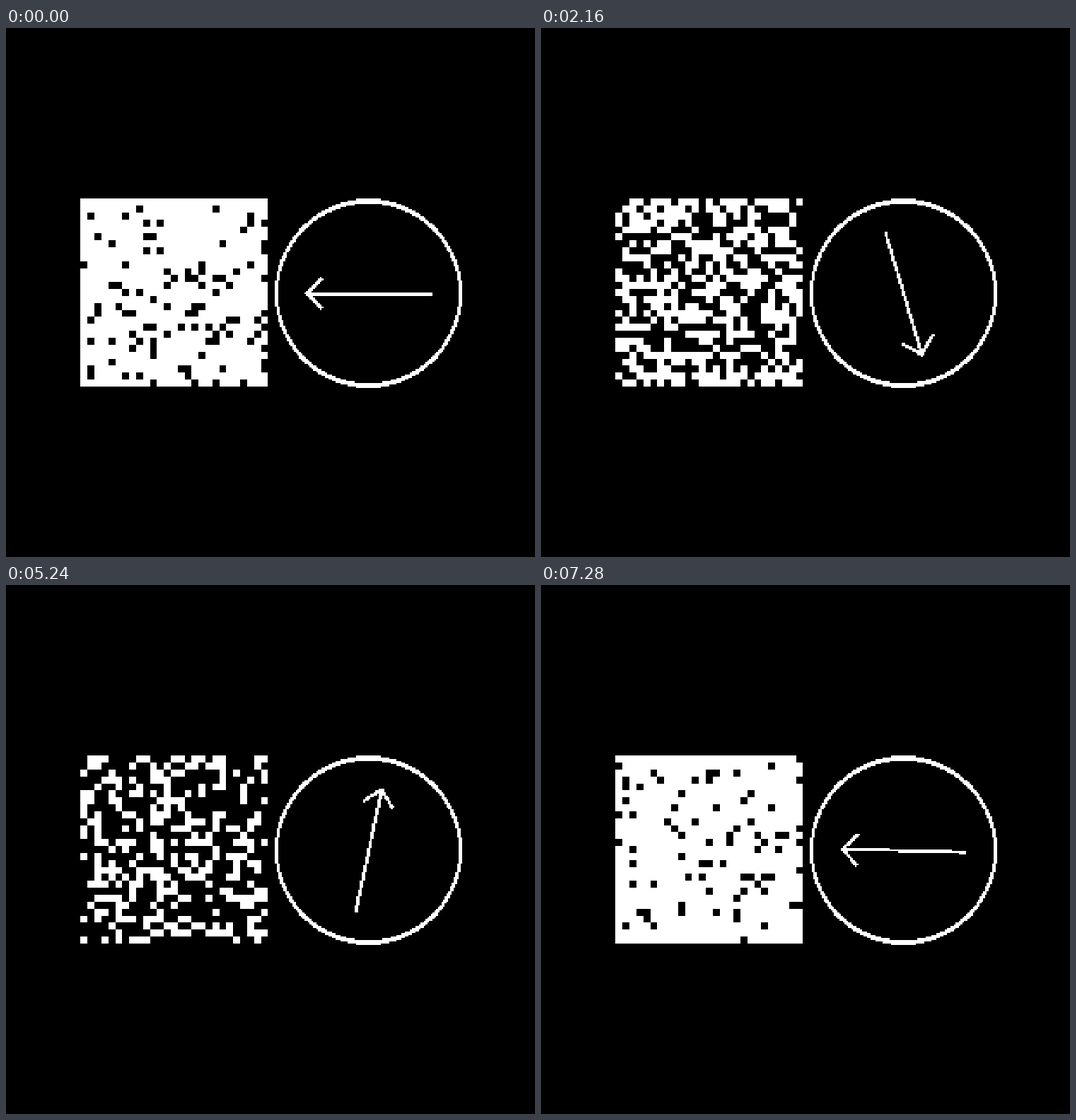
These frames come from a looping animation (748 by 748 pixels, 7.32 s). An HTML page with a canvas:

```html
<!DOCTYPE html>
<html lang="en">
<head>
<meta charset="utf-8">
<title>Noise and arrow</title>
<style>
  html, body { margin: 0; width: 100%; height: 100%; overflow: hidden; background: #000; }
  canvas { display: block; width: 100vw; height: 100vh; image-rendering: pixelated; }
</style>
</head>
<body>
<canvas id="stage" width="305" height="304"></canvas>
<script>
const ctx = document.getElementById('stage').getContext('2d');
const STEP = 40, STEPS = 183;
const GRID = { x: 43, y: 98, count: 27, size: 4 };
const RING = { x: 208.5, y: 152 };
const HUB = { x: 209, y: 152.5 };
const REACH = 36, BARB = 12;

function seeded(seed) {
  let s = seed >>> 0;
  return () => {
    s = (s + 0x6D2B79F5) >>> 0;
    let t = Math.imul(s ^ (s >>> 15), s | 1);
    t ^= t + Math.imul(t ^ (t >>> 7), t | 61);
    return ((t ^ (t >>> 14)) >>> 0) / 4294967296;
  };
}

const dot = (x, y) => ctx.fillRect(x, y, 1, 1);

// Hard-edged line about two units wide
function line(x0, y0, x1, y1) {
  const dx = x1 - x0, dy = y1 - y0, len = Math.hypot(dx, dy);
  for (let y = Math.min(y0, y1) - 2; y <= Math.max(y0, y1) + 2; y++) {
    for (let x = Math.min(x0, x1) - 2; x <= Math.max(x0, x1) + 2; x++) {
      const px = x - x0 - 0.16, py = y - y0 - 0.16;
      const along = (px * dx + py * dy) / len;
      const off = Math.abs(px * dy - py * dx) / len;
      if (off <= 0.94 && along >= -0.75 && along <= len + 0.75) dot(x, y);
    }
  }
}

function ring() {
  const inside = (x, y, rx, ry) => (x / rx) ** 2 + (y / ry) ** 2 <= 1;
  for (let y = 98; y < 207; y++) {
    for (let x = 155; x < 263; x++) {
      const px = x - RING.x, py = y - RING.y;
      if (inside(px, py, 54, 54.4) && !inside(px, py, 52, 51.6)) dot(x, y);
    }
  }
}

function arrow(angle) {
  const ux = -Math.cos(angle), uy = Math.sin(angle);
  const tipX = Math.floor(HUB.x + REACH * ux), tipY = Math.floor(HUB.y + REACH * uy);
  line(tipX, tipY, Math.floor(HUB.x - REACH * ux), Math.floor(HUB.y - REACH * uy));
  for (const turn of [-Math.PI / 4, Math.PI / 4]) {
    const a = angle + turn;
    line(tipX, tipY, Math.round(tipX + BARB * Math.cos(a)), Math.round(tipY - BARB * Math.sin(a)));
  }
}

function noise(step, angle) {
  const random = seeded(step * 7919 + 17);
  const density = 0.55 + 0.35 * Math.cos(angle - 0.22);
  for (let r = 0; r < GRID.count; r++) {
    for (let c = 0; c < GRID.count; c++) {
      if (random() < density) {
        ctx.fillRect(GRID.x + c * GRID.size, GRID.y + r * GRID.size, GRID.size, GRID.size);
      }
    }
  }
}

function draw(step) {
  const angle = step / STEPS * 2 * Math.PI;
  ctx.fillStyle = '#000';
  ctx.fillRect(0, 0, 305, 304);
  ctx.fillStyle = '#fff';
  noise(step, angle);
  ring();
  arrow(angle);
}

const start = performance.now();
let shown = 0;
function tick() {
  const step = Math.floor((performance.now() - start) / STEP) % STEPS;
  if (step !== shown) draw(shown = step);
  requestAnimationFrame(tick);
}
draw(0);
requestAnimationFrame(tick);
</script>
</body>
</html>
```
